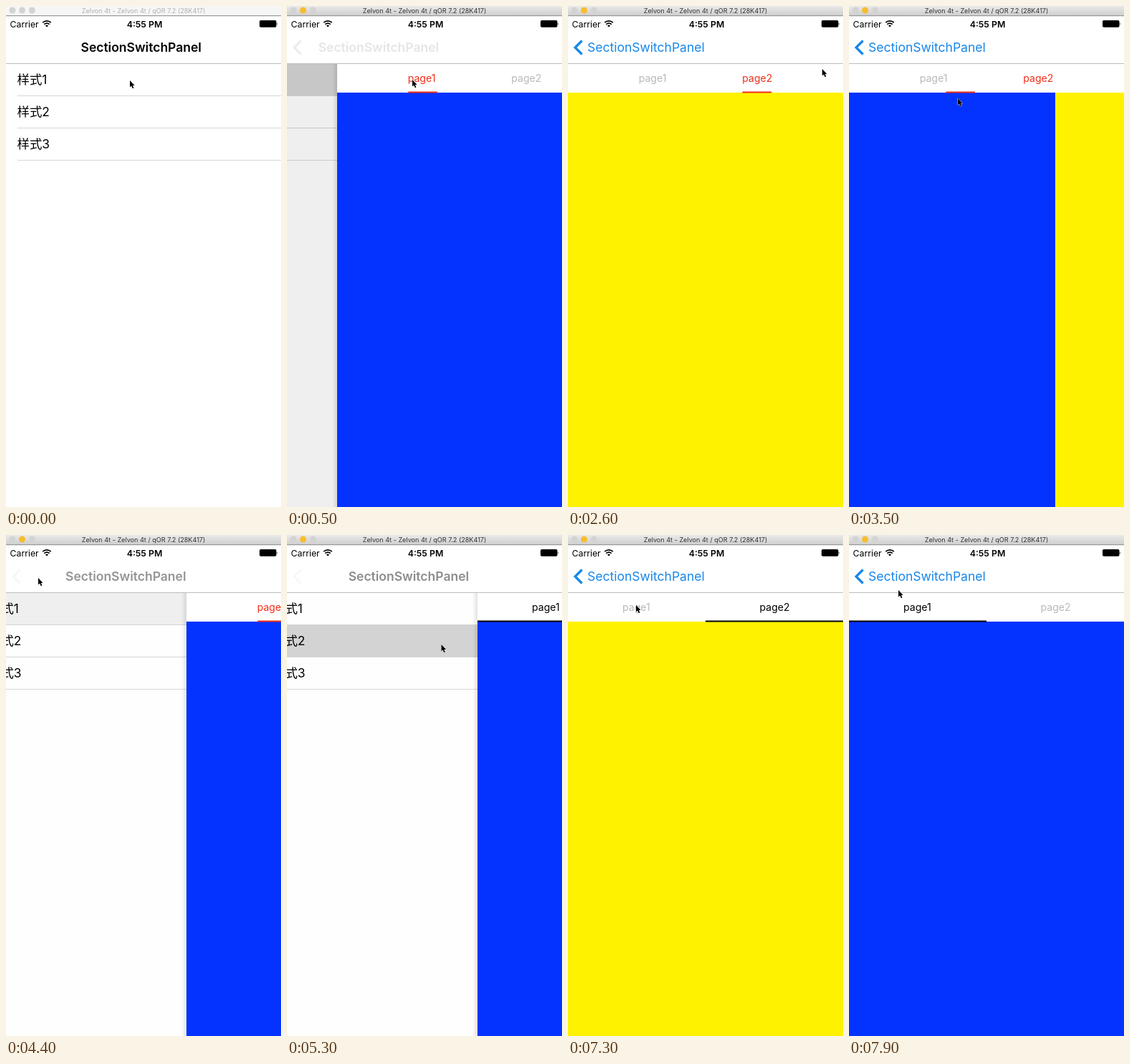
Write an HTML page that moves like this. It is 384x700 px and loops after 8 s.

```html
<!DOCTYPE html>
<html lang="en">
<head>
<meta charset="utf-8">
<style>
  html, body { margin: 0; width: 100%; height: 100%; overflow: hidden; background: #fff; }
  svg { display: block; width: 384px; height: 700px; }
  text { font-family: Inter, "Noto Sans CJK SC", "Noto Sans CJK", sans-serif; white-space: pre; }
  .nav { font-size: 17.5px; }
  .tab { font-size: 14.1px; }
</style>
</head>
<body>
<svg viewBox="0 0 384 700">
  <defs>
    <linearGradient id="chrome" x2="0" y2="1">
      <stop offset="0" stop-color="#e9e9e9"/><stop offset="1" stop-color="#d0d0d0"/>
    </linearGradient>
    <linearGradient id="edge">
      <stop offset="0" stop-opacity="0"/><stop offset="1" stop-opacity=".11"/>
    </linearGradient>
  </defs>
  <rect width="384" height="700" fill="#fff"/>

  <g id="list">
    <rect id="row" y="81" width="384" height="45" fill="#d4d4d4"/>
    <g id="cells" font-size="17.4"></g>
  </g>
  <rect id="dim" y="81" width="384" height="619"/>

  <g id="page">
    <rect id="shadow" x="-7" y="81" width="7" height="619" fill="url(#edge)"/>
    <rect y="81" width="384" height="40" fill="#fff"/>
    <text id="tab1" class="tab" y="106">page1</text>
    <text id="tab2" class="tab" y="106">page2</text>
    <rect y="121" width="384" height="579" fill="#0433ff"/>
    <rect id="yellow" y="121" width="384" height="579" fill="#fff200"/>
    <rect id="bar" y="119.5" height="2"/>
  </g>

  <rect width="384" height="80" fill="#fff"/>
  <rect y="80" width="384" height="1" fill="#bdbdbd"/>
  <path id="chevron" d="M19.5 48.5 10 58l9.5 9.5" fill="none" stroke-width="3.3"/>
  <text id="title" class="nav" y="64" font-weight="600">SectionSwitchPanel</text>
  <text id="back" class="nav" y="64" fill="#1787e8">SectionSwitchPanel</text>

  <text x="5.5" y="29.5" font-size="12.3">Carrier</text>
  <g fill="none" stroke="#000" stroke-width="1.7">
    <path d="M51.2 23.2a8.4 8.4 0 0 1 11.6 0M53.3 25.6a5.2 5.2 0 0 1 7.4 0"/>
    <path d="M57 29.6 55 27.5a2.9 2.9 0 0 1 4 0Z" fill="#000" stroke="none"/>
  </g>
  <text x="193.5" y="29.5" font-size="12.3" font-weight="600" text-anchor="middle">4:55 PM</text>
  <rect x="354" y="20" width="23.5" height="9.8" rx="1.8"/>
  <path d="M378.3 23.3q1.6 1.7 0 3.4Z"/>

  <rect id="window" width="384" height="13"/>
  <rect y="13" width="384" height="1.2" fill="#979797"/>
  <circle cx="9" cy="6" r="4.5" fill="#d3d3d3"/>
  <circle id="light" cx="22.5" cy="6" r="4.5"/>
  <circle cx="36.3" cy="6" r="4.5" fill="#d3d3d3"/>
  <text id="caption" x="192" y="9.8" font-size="9.1" text-anchor="middle">Zelvon 4t - Zelvon 4t / qOR 7.2 (28K417)</text>

  <path id="cursor" d="M0 0V9.4L2.1 7.5 3.8 11.2 5.4 10.4 3.8 6.9H6.6Z" stroke="#fff" stroke-width=".8" paint-order="stroke"/>
</svg>
<script>
const LOOP = 8000, STEP = 100, W = 384;
const BLUE = "#1787e8", GRAY = "#b8b8b8";
const $ = id => document.getElementById(id);
const set = (id, attrs) => {
  for (const k in attrs) $(id).setAttribute(k, attrs[k]);
};
const shift = (id, x, y = 0) => set(id, { transform: `translate(${x} ${y})` });
const lerp = (a, b, u) => a + (b - a) * u;
const clamp = u => Math.min(1, Math.max(0, u));
const ease = (t, start, span) => (1 - Math.cos(Math.PI * clamp((t - start) / span))) / 2;

// Critically damped spring for navigation and swipes
function spring(t, start) {
  const u = Math.max(0, t - start) * 0.015;
  return 1 - (1 + u) * Math.exp(-u);
}

// Pointer stops: arrival time, x, y
const stops = [
  [300, 175, 103], [1200, 215, 290], [1600, 52, 292], [2400, 355, 88],
  [3200, 60, 142], [3500, 152, 129], [4100, 45, 60], [5000, 215.5, 153],
  [6400, 277, 97], [7300, 95, 98], [7900, 69, 77]
];

function drawPointer(t) {
  let [last, x, y] = [0, 173, 104];
  for (const [end, toX, toY] of stops) {
    const span = Math.min(600, end - last);
    const u = ease(t, end - span, span);
    x = lerp(x, toX, u);
    y = lerp(y, toY, u);
    last = end;
  }
  shift("cursor", x, y);
}

$("cells").innerHTML = [1, 2, 3].map(n => {
  const y = 80 + 45 * n;
  return `<text x="15.5" y="${y - 16}">样式${n}</text><rect x="16" y="${y}" width="368" height="1" fill="#d6d6d8"/>`;
}).join("");

function drawTabs(t, second) {
  const pos = second
    ? ease(t, 6663, 340) - ease(t, 7463, 340)
    : spring(t, 1260) - spring(t, 3320.5);
  const picked = second ? t >= 6700 && t < 7500 : t >= 1900 && t < 3900;
  const on = second ? "#000" : "#f22d18";
  set("tab1", { x: second ? 76 : 98.7, fill: picked ? GRAY : on });
  set("tab2", { x: second ? 267.5 : 243.3, fill: picked ? on : GRAY });
  set("bar", {
    x: second ? 192 * pos : lerp(99.3, 243.6, pos),
    width: second ? 192 : 40.5,
    fill: on
  });
  const edge = Math.round(W * (1 - pos));
  set("yellow", { x: edge, width: W - edge });
}

function drawNav(p) {
  const late = clamp((p - .83) / .16);
  set("title", { x: lerp(104.5, 27, p ** 1.2), opacity: 1 - Math.sqrt(p) });
  set("back", { x: lerp(43, 27, late), opacity: late });
  set("chevron", { stroke: late ? BLUE : "#000", opacity: late || .09 * p });
}

function draw(t) {
  const second = t >= 5000, active = t >= 100;
  const push = spring(t, 292.5), pop = spring(t, 4250);
  const p = second ? spring(t, 5225.5) : push * (1 - pop);

  set("window", { fill: active ? "url(#chrome)" : "#f6f6f6" });
  set("light", { fill: active ? "#f8bd2e" : "#d3d3d3" });
  set("caption", { fill: active ? "#333" : "#b0b0b0" });

  set("row", { y: second ? 126 : 81, opacity: second ? 1 : t < 200 ? 0 : 1 - pop });
  shift("list", -.3 * W * p);
  set("dim", { opacity: .115 * p ** 3 });
  shift("page", Math.round(W * (1 - p)));
  set("shadow", { opacity: clamp(4 * p) });
  drawTabs(t, second);
  drawNav(p);
  drawPointer(t);
}

const begin = performance.now();
function tick() {
  const t = (performance.now() - begin) % LOOP;
  draw(Math.floor(t / STEP) * STEP);
  requestAnimationFrame(tick);
}
tick();
</script>
</body>
</html>
```
